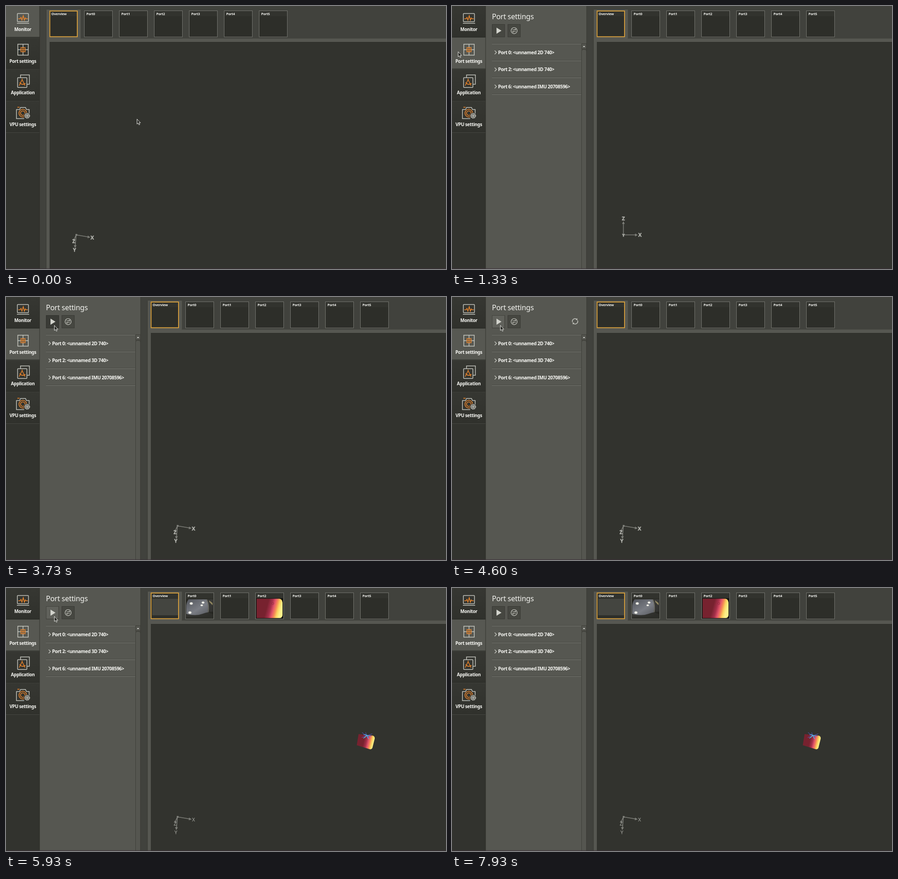
These frames come from a looping animation (969x578 px, 7.99 s). An HTML page:

```html
<!DOCTYPE html>
<html lang="en">
<head>
<meta charset="utf-8">
<title>Port settings</title>
<style>
html, body { margin: 0; width: 100%; height: 100%; overflow: hidden; background: #32332e; }
svg { display: block; width: 969px; height: 578px; font-family: "Noto Sans", "Open Sans", sans-serif; }
.side { font-size: 9.9px; font-weight: 600; letter-spacing: -.35px; fill: #f8f8f4; text-anchor: middle; }
.tab { font-size: 7.3px; font-weight: 700; letter-spacing: -.12px; fill: #f8f8f4; }
.row { font-size: 10.3px; font-weight: 600; letter-spacing: -.42px; fill: #f8f8f4; }
.title { font-size: 16px; letter-spacing: -.28px; fill: #f4f4f0; }
.tip { font-size: 10.3px; font-weight: 500; letter-spacing: -.28px; fill: #fbfbf7; }
.axis { font-size: 11px; fill: #a9aaa4; text-anchor: middle; }
.heavy { font-weight: 800; fill: #b4b5af; stroke: #b4b5af; stroke-width: .5; }
.grey { fill: none; stroke: #c6c7c0; stroke-width: 1.5; }
.orange { fill: none; stroke: #e8842c; stroke-width: 1.6; }
.arm { fill: none; stroke: #7d7e78; stroke-width: 1.6; }
.head { fill: #7d7e78; }
#spin { transform-origin: 271px 53.5px; }
#tooltip rect { filter: drop-shadow(1px 2px 2px rgba(0, 0, 0, .4)); }
</style>
</head>
<body>
<svg viewBox="0 0 969 578">
  <defs>
    <linearGradient id="btn" x2="0" y2="1">
      <stop stop-color="#363732"/><stop offset="1" stop-color="#30312c"/>
    </linearGradient>
    <radialGradient id="glow" r=".6">
      <stop stop-color="#fff" stop-opacity=".09"/><stop offset="1" stop-color="#fff" stop-opacity=".01"/>
    </radialGradient>
    <linearGradient id="heat" x1="0" y1="0" x2="1" y2=".2">
      <stop offset=".46" stop-color="#77222f"/><stop offset=".61" stop-color="#a5304a"/>
      <stop offset=".72" stop-color="#e4566a"/><stop offset=".81" stop-color="#f58a56"/>
      <stop offset=".9" stop-color="#fbd35f"/><stop offset="1" stop-color="#fdf08a"/>
    </linearGradient>
    <linearGradient id="warm" x2="1" y2="1">
      <stop stop-color="#5d5537"/><stop offset=".5" stop-color="#85794f"/><stop offset="1" stop-color="#55502f"/>
    </linearGradient>
    <linearGradient id="cool" x2="1" y2="1">
      <stop stop-color="#52555c"/><stop offset=".5" stop-color="#7a7d84"/><stop offset="1" stop-color="#4a4c50"/>
    </linearGradient>
    <radialGradient id="lamp">
      <stop offset=".45" stop-color="#fffdf0"/><stop offset="1" stop-color="#fffdf0" stop-opacity="0"/>
    </radialGradient>
    <clipPath id="photoBox"><rect x="397" y="25" width="59" height="38"/></clipPath>
  </defs>

  <rect width="969" height="578" fill="#41423d"/>

  <g id="main">
    <path d="M89 578V8H164V72H969V79H96V578Z" fill="#565751"/>
    <path d="M164.5 8V71.5H969" fill="none" stroke="#4b4c46"/>
    <path d="M88.5 578V8" stroke="#383934"/>
    <rect x="96" y="79" width="873" height="499" fill="#32332e"/>
    <path d="M96 79.5H969" stroke="#2d2e29"/>
    <g id="tabs"></g>
    <g id="axes">
      <path class="arm" d="M154.500 503L181 507.500M154.500 503L152.500 527M154.500 503L149.500 514"/>
      <path class="head" d="M180 504.500L186 508.300L179.500 510.500ZM149.300 525.500L155.500 526L152 532ZM148 511L152 513L149 517ZM153 501h4v4h-4z"/>
      <g id="heavyLabels" class="axis heavy"><text x="190" y="513">X</text><text x="151" y="540">Y</text><text x="149.300" y="521">Z</text></g>
      <g id="lightLabels" class="axis"><text x="190" y="513">X</text><text x="151" y="540.500">Y</text><text x="149.300" y="521.500">Z</text></g>
    </g>
    <g id="flatAxes">
      <path class="arm" d="M154.500 503V477M154.500 503H181"/>
      <path class="head" d="M151.500 479L154.500 473L157.500 479ZM180 500L186 503.300L180 506.500Z"/>
      <g class="axis heavy"><text x="191" y="507.300">X</text><text x="154.500" y="471">Z</text><text x="154.500" y="507" font-size="9">Y</text></g>
    </g>
  </g>

  <g id="panel">
    <rect x="74" width="222.500" height="578" fill="#565751"/>
    <path d="M296.500 0V578" stroke="#383934"/>
    <text class="title" x="88" y="29.300">Port settings</text>
    <g fill="#464741" stroke="#383934"><rect x="88.500" y="40.500" width="27.500" height="27.500"/><rect x="123" y="40.500" width="27.500" height="27.500"/></g>
    <rect id="hoverPlay" x="88.500" y="40.500" width="27.500" height="27.500" fill="#60615b" stroke="#42433d"/>
    <rect id="pressPlay" x="88.500" y="40.500" width="27.500" height="27.500" fill="#3a3b36" stroke="#30312c"/>
    <path d="M98 47.500L109 54.300L98 61Z" fill="#d2d3cc"/>
    <g fill="none" stroke="#d2d3cc" stroke-width="1.200">
      <circle cx="136.800" cy="54.200" r="6.700"/>
      <path d="M133 52.500H140.500M138.500 50.500L140.700 52.500M140.700 56H133M135.200 58L133 56"/>
    </g>
    <g id="rows"></g>
    <rect x="285" y="82.500" width="11" height="496" fill="#484943"/>
    <rect x="285.500" y="83" width="10.500" height="11" fill="#555650" stroke="#3e3f39"/>
    <path d="M288.500 90L290.800 87.500L293 90Z" fill="#f0f0ec"/>
    <rect x="285.500" y="95.500" width="10.500" height="500" rx="4" fill="#555650" stroke="#3e3f39"/>
    <g id="busy"><g id="spin" fill="none" stroke="#c6c7c0" stroke-width="1.500">
      <path d="M265.500 55.500A5.800 5.800 0 0 1 275 49.300M276.500 51.500A5.800 5.800 0 0 1 267 57.700"/>
      <path d="M272.500 50.300L276.300 50.800L276 46.500ZM269.500 56.700L265.700 56.200L266 60.500Z" fill="#c6c7c0" stroke="none"/>
    </g></g>
  </g>

  <g id="live">
    <rect x="322" y="23.500" width="57" height="36.500" fill="#444540"/>
    <g clip-path="url(#photoBox)">
      <rect x="397" y="25" width="59" height="38" fill="url(#cool)"/>
      <rect id="warmth" x="397" y="25" width="59" height="38" fill="url(#warm)"/>
      <path d="M441 25Q447 38 444 53L456 58V25Z" fill="#24241f" opacity=".75"/>
      <path d="M442 25Q448 38 445 54" fill="none" stroke="#d5d2bd" opacity=".6"/>
      <path d="M447 27L455 33L455 38L448 31Z" fill="#c9b978" opacity=".6"/>
      <path d="M397 57Q418 62 432 57T456 52V63H397Z" fill="#25251f" opacity=".8"/>
      <path d="M397 25H402Q398 30 397 38Z" fill="#25251f"/>
      <g fill="url(#lamp)">
        <ellipse cx="408" cy="34" rx="4.500" ry="3.500"/><ellipse cx="434" cy="32" rx="4" ry="3"/>
        <ellipse cx="405" cy="54" rx="4.500" ry="3.500"/><ellipse cx="431" cy="38" rx="3.500" ry="2.500"/>
      </g>
    </g>
    <rect x="551" y="22.500" width="59" height="44.500" fill="#11110f"/>
    <path d="M552 23.500H602Q608 24 609 32V60Q608 65 604 66H552Z" fill="url(#heat)"/>
    <circle cx="587.500" cy="34" r="2.300" fill="none" stroke="#8d2b3f" stroke-width=".8"/>
    <path id="cloud" d="M776.500 321L808 324.500Q812.500 326 812 331L807 351Q805 355.500 800 354L772.500 345.500Z" fill="url(#heat)"/>
    <path d="M787 322.500L802 324.500M794.500 324L787 330.500M794.500 324L798.500 332" fill="none" stroke="#45c3cf" stroke-width="1.100"/>
    <path id="rays" d="M784 317.500L800 329M806.500 320.500L783.500 328.500M792 317.500L797 330M787 322L805 326" fill="none" stroke="#5a5bd6" stroke-width=".9"/>
    <path id="core" d="M790 321.500L799 325.500M794.500 324L789.500 329M794.500 324L798 331" fill="none" stroke="#52c2e4" stroke-width="1.100"/>
  </g>

  <rect width="74" height="578" fill="#32332e"/>
  <g id="side"></g>
  <path d="M74 0V578" stroke="#2b2c27" stroke-width=".8"/>
  <rect y="576" width="969" height="2" fill="#3a3038" opacity=".5"/>

  <g id="tooltip">
    <rect x="108.500" y="73.500" width="126" height="15" fill="#30312c" stroke="#5b5c56"/>
    <text class="tip" x="112" y="84.500">Set all ports to RUN state</text>
  </g>
  <g id="cursor"><path d="M.5.500V11.500L3 9.300L4.900 13.300L6.700 12.400L4.900 8.700H8.300Z" fill="#292a26" stroke="#e6e6e2"/></g>
</svg>
<script>
const LOOP = 7990;
const $ = id => document.getElementById(id);
const sheet = document.head.appendChild(document.createElement('style'));

// Each key is [ms, declarations]; values hold until the next key.
function animate(id, keys) {
  const body = keys.map(([ms, css]) => `${(ms / LOOP * 100).toFixed(4)}%{${css}}`).join('');
  sheet.textContent += `@keyframes k-${id}{${body}}#${id}{animation:k-${id} ${LOOP}ms step-end infinite}`;
}

function show(id, from, to = LOOP) {
  const keys = [[0, `opacity:${from ? 0 : 1}`]];
  if (from) keys.push([from, 'opacity:1']);
  keys.push([to, 'opacity:0']);
  if (to < LOOP) keys.push([LOOP, 'opacity:0']);
  animate(id, keys);
}

const ICONS = [
  `<rect class="grey" x="25" y="16.500" width="24.500" height="18" rx="1"/><path class="grey" d="M24 38H51"/>
   <path class="orange" d="M27 28H31L33 25L35 31L38 21.500L40.500 31L42.500 26L44 28H48" stroke-width="1.200"/>`,
  `<rect class="grey" x="26" y="84" width="23" height="24"/><path class="grey" stroke-width="1.200" d="M37.500 84V91M37.500 101V108M26 96H32.500M42.500 96H49"/>
   <path class="orange" d="M33 91.500H42V100.500H33ZM37.500 92V100M33.500 96H41.500"/>`,
  `<path class="grey" d="M32 157V151.500H51.500V172H46"/><rect class="grey" x="25.500" y="157.500" width="20.500" height="21.500" rx="1"/>
   <path class="orange" d="M29 175L35.500 162L42 175M30 168Q35 175 43 170M35.500 159.500V162"/>`,
  `<path class="grey" d="M23 227.500H30L32 223H43L45 227.500H51V237M40 247.500H23V227"/><path class="orange" d="M25 222.500H30"/>
   <circle class="orange" cx="37" cy="235.500" r="8.500"/><circle class="orange" cx="37" cy="235.500" r="5"/>
   <circle cx="46.800" cy="241.300" r="7" fill="#32332e"/><circle cx="46.800" cy="241.300" r="5.300" fill="#777872" stroke="#c6c7c0" stroke-width="1.500" stroke-dasharray="2.800 1"/>
   <path d="M43.500 241.300H50M46.800 238V244.600" stroke="#c6c7c0"/>`
];

$('side').innerHTML = ['Monitor', 'Port settings', 'Application', 'VPU settings'].map((name, i) => {
  const y = i * 69.5;
  const box = `x="0" y="${y}" width="74" height="69"`;
  const key = ['monitor', 'ports'][i];
  const states = key ? `<rect id="${key}Hover" ${box} fill="url(#glow)"/><rect id="${key}On" ${box} fill="#575852"/>` : '';
  return `<rect ${box} fill="url(#btn)"/>${states}
    <path d="M0 ${y + 68.5}H74" stroke="#282924"/><path d="M0 ${y + 69.5}H74" stroke="#4b4c47"/>
    ${ICONS[i]}<text class="side" x="37" y="${y + 55.2}">${name}</text>`;
}).join('');

$('tabs').innerHTML = ['Overview', 'Port0', 'Port1', 'Port2', 'Port3', 'Port4', 'Port5'].map((name, i) => {
  const x = 95.5 + i * 77;
  const edge = i
    ? `<rect x="${x}" y="10.500" width="62" height="57.500" fill="none" stroke="#74756f"/>`
    : `<rect x="${x + 1}" y="11" width="60.500" height="56.500" fill="none" stroke="#e2a63c" stroke-width="1.800"/>`;
  return `<rect x="${x}" y="10.500" width="62" height="57.500" fill="#2d2e29"/>
    <rect x="${x}" y="11" width="62" height="11.500" fill="#32332e"/>
    ${edge}<text class="tab" x="${x + 4.5}" y="19.800">${name}</text>`;
}).join('');

const rule = y => `<path d="M88 ${y - 1}H284.500" stroke="#454640"/><path d="M88 ${y}H284.500" stroke="#777872"/>`;
$('rows').innerHTML = rule(83.5) + ['Port 0: <unnamed 2D 740>', 'Port 2: <unnamed 3D 740>', 'Port 6: <unnamed IMU 20708596>'].map((name, i) => {
  const y = 102 + i * 37.5;
  return `<path d="M94 ${y - 4}L98 ${y}L94 ${y + 4}" fill="none" stroke="#d2d3cc" stroke-width="1.200"/>
    <text class="row" x="101.500" y="${y + 3.7}">${name.replace('<', '&lt;')}</text>${rule(120.5 + i * 37)}`;
}).join('');

const OPEN = 1330, TURNED = 1400, DATA = 4930;
animate('main', [[0, 'transform:none'], [OPEN, 'transform:translateX(223px)'], [LOOP, 'transform:translateX(223px)']]);
show('panel', OPEN);
show('portsOn', OPEN);
show('monitorOn', 0, OPEN);
show('portsHover', 670, OPEN);
show('monitorHover', 6800, 7200);
show('flatAxes', OPEN, TURNED);
animate('axes', [[0, 'opacity:1'], [OPEN, 'opacity:0'], [TURNED, 'opacity:1'], [LOOP, 'opacity:1']]);
show('heavyLabels', 0, DATA);
show('lightLabels', DATA);
show('hoverPlay', 2200, 6670);
show('pressPlay', 3670, 3800);
show('tooltip', 2670, 3670);
show('busy', 4400, 5530);
show('live', DATA);
show('rays', 5330);
show('core', 5330);

const LINEAR = ';animation-timing-function:linear';
animate('spin', [[0, 'transform:rotate(-85deg)'], [4400, 'transform:rotate(-85deg);animation-timing-function:steps(17)'],
  [5530, 'transform:rotate(395deg)'], [LOOP, 'transform:rotate(395deg)']]);
animate('warmth', [[0, 'opacity:1'], [5200, 'opacity:1' + LINEAR], [5800, 'opacity:0'], [LOOP, 'opacity:0']]);

const path = [
  [0, 288, 248], [400, 277, 241], [470, 226, 213], [530, 150, 168], [600, 76, 128], [670, 32, 109], [800, 15, 101], [1000, 13, 100],
  [2000, 19, 98], [2070, 48, 86], [2130, 80, 74], [2200, 100, 65], [2400, 106, 62],
  [6530, 104, 60], [6600, 98, 54], [6670, 88, 44], [6730, 78, 34], [6800, 68, 25], [6870, 60, 18], [6930, 53, 13],
  [7000, 46, 8], [7070, 39, 4], [7130, 33, 0], [7200, 27, -6], [7270, 26, -20], [LOOP, 26, -20]
];
animate('cursor', path.map(([ms, x, y]) => [ms, `transform:translate(${x}px,${y}px)`]));
</script>
</body>
</html>
```
